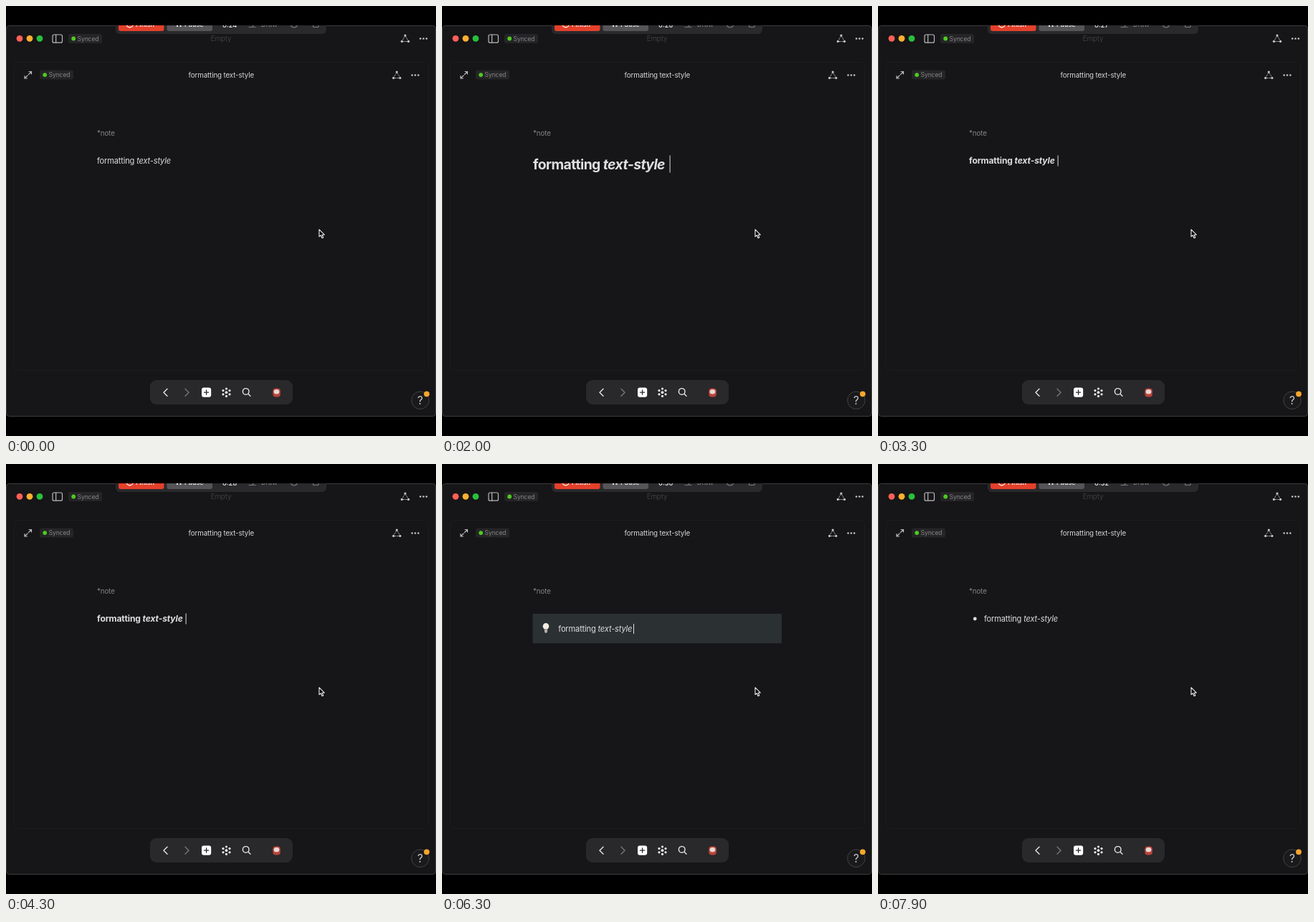
Recreate the animation shown at these times as an HTML page. Size 600 px wide and 600 px high, loop 8 s.

```html
<!DOCTYPE html>
<html lang="en">
<head>
<meta charset="utf-8">
<title>Text styles</title>
<style>
  html, body { margin: 0; width: 100%; height: 100%; overflow: hidden; background: #000; }
  svg { display: block; width: 100vw; height: 100vh; font-family: Inter, "Liberation Sans", sans-serif; }
  .line { fill: none; stroke-linecap: round; stroke-linejoin: round; }
  .pill { font-size: 8.6px; letter-spacing: -.13px; fill: #858487; }
  .title { font-size: 9.8px; letter-spacing: -.14px; text-anchor: middle; }
  .tool { font-size: 9px; font-weight: 600; }
  #copy { fill: #dedddf; white-space: pre; }
  #copy .it { font-style: italic; }
  .mark { display: none; }
</style>
</head>
<body>
<svg viewBox="0 0 600 600">
  <defs>
    <clipPath id="win"><rect y="27" width="600" height="546" rx="4"/></clipPath>
    <g id="synced">
      <rect width="47" height="13" rx="3" fill="#252427"/>
      <circle cx="7.2" cy="6.5" r="2.9" fill="#4dcb1f"/>
      <text class="pill" x="12.6" y="9.6">Synced</text>
    </g>
    <g id="graph">
      <path class="line" d="M-.8-2.6-3.9 2.6M.8-2.6 3.9 2.6M-2.6 4.2H2.6" stroke="#aaa9ac" stroke-dasharray="1.6 1.7"/>
      <g fill="#c6c5c8"><circle cy="-4.2" r="1.6"/><circle cx="-4.6" cy="4.1" r="1.6"/><circle cx="4.6" cy="4.1" r="1.6"/></g>
    </g>
    <g id="more" fill="#c6c5c8"><circle cx="-4.3" r="1.3"/><circle r="1.3"/><circle cx="4.3" r="1.3"/></g>
  </defs>

  <rect width="600" height="600"/>
  <rect x=".5" y="27.5" width="599" height="545" rx="4" fill="#161517" stroke="#3d3c3f"/>
  <rect x="11.5" y="78.5" width="578" height="430" rx="6" fill="none" stroke="#1d1c1f"/>

  <!-- recorder strip, cut off by the window edge -->
  <g clip-path="url(#win)">
    <rect x="153" y="12" width="294" height="27" rx="6" fill="#2a292c"/>
    <rect x="157" y="12" width="63.500" height="23" rx="3" fill="#e4402b"/>
    <rect x="224.500" y="12" width="63.500" height="23" rx="3" fill="#555457"/>
    <circle class="line" cx="172.700" cy="25" r="4.800" stroke="#fff" stroke-width="1.200"/>
    <path d="M238 20h2v9h-2zM242.500 20h2v9h-2z" fill="#e8e8e8"/>
    <g class="tool">
      <text x="181" y="29" fill="#fff">Finish</text>
      <text x="249" y="29" fill="#e8e8e8">Pause</text>
      <text id="clock" x="302" y="30" fill="#dddcdf"></text>
      <text x="356" y="29" fill="#77767a">Draw</text>
    </g>
    <g class="line" stroke="#77767a" stroke-width="1.200">
      <path d="M339 29.500h4l5-5M345 29.500h3"/>
      <circle cx="402" cy="25" r="5"/>
      <rect x="428.500" y="22" width="7.500" height="7.500" rx="1"/>
    </g>
  </g>

  <!-- window header -->
  <circle cx="19" cy="45.300" r="4.400" fill="#ff5f57"/>
  <circle cx="33" cy="45.300" r="4.400" fill="#fdb02f"/>
  <circle cx="47" cy="45.300" r="4.400" fill="#28c03c"/>
  <g class="line" stroke="#bab9bc" stroke-width="1.200">
    <rect x="65" y="40" width="13.500" height="11.200" rx="2"/>
    <path d="M69.700 40V51"/>
  </g>
  <use href="#synced" x="87" y="39"/>
  <text class="title" x="300" y="49" fill="#3f3e42">Empty</text>
  <use href="#graph" x="557" y="45.300"/>
  <use href="#more" x="582.500" y="45.500"/>

  <!-- page header -->
  <path class="line" d="M32 91.500h3.500V95M35.500 91.500l-4 4M29.500 101H26v-3.500M26 101l4-4" stroke="#bab9bc" stroke-width="1.200"/>
  <use href="#synced" x="47" y="89.600"/>
  <text class="title" x="300.300" y="99.700" fill="#d6d5d8">formatting text-style</text>
  <use href="#graph" x="545.300" y="96.300"/>
  <use href="#more" x="571" y="96.500"/>

  <!-- document -->
  <text x="127" y="180.800" font-size="9.800" letter-spacing="-.1" fill="#858487">*note</text>
  <rect class="mark" id="quote" x="134" y="205" width="1.600" height="21" fill="#dedddf"/>
  <g class="mark" id="callout">
    <rect x="126.500" y="209" width="347.500" height="41.300" rx="1.500" fill="#2b3032"/>
    <path d="M142.700 230.500c-1.200-1.500-2-2.500-2-4.200a4.300 4.300 0 0 1 8.600 0c0 1.700-.8 2.700-2 4.200z" fill="#f4ece2"/>
    <path d="M143 230.800h4v3.200l-1 1.800h-2l-1-1.800z" fill="#b5aeaa"/>
  </g>
  <circle class="mark" id="check" cx="135" cy="216" r="6" fill="none" stroke="#b0afb2"/>
  <circle class="mark" id="bullet" cx="135.300" cy="216" r="2.400" fill="#dedddf"/>
  <text id="copy">formatting <tspan class="it">text-style</tspan></text>
  <rect id="caret" width="1" fill="#dedddf"/>

  <!-- navigation -->
  <rect x="201" y="522" width="199" height="34" rx="9" fill="#29282b"/>
  <g class="line" stroke-width="1.400">
    <path d="M225 534.300l-5 5 5 5" stroke="#e8e7ea"/>
    <path d="M250 534.300l5 5-5 5" stroke="#77767a"/>
    <g stroke="#e8e7ea"><circle cx="334.700" cy="537.900" r="4.300"/><path d="M338 541.200l3 3"/></g>
  </g>
  <rect x="273" y="532.500" width="13.200" height="13.200" rx="3" fill="#fff"/>
  <path class="line" d="M279.600 536v6.200M276.500 539.100h6.200" stroke="#29282b" stroke-width="1.300"/>
  <g id="flower" fill="#f0eff2"><circle cx="307.500" cy="539.200" r="1.900"/></g>
  <path d="M357 532v14" stroke="#2d2c2f"/>
  <rect x="372.300" y="533.500" width="10.600" height="12" rx="4" fill="#b9433a"/>
  <ellipse cx="377.500" cy="538.300" rx="3.800" ry="3.200" fill="#e6d9d6"/>

  <circle cx="578" cy="550.200" r="12.300" fill="#1a191b" stroke="#424144"/>
  <text x="578" y="555.800" font-size="15.500" text-anchor="middle" fill="#c9c8cb">?</text>
  <circle cx="587" cy="541.300" r="3.900" fill="#f6a62c"/>

  <path d="M437 311.800v10l2.300-2 1.700 3.900 1.800-.8-1.700-3.700h3.100z" fill="#000" stroke="#f2f2f2" stroke-width="1.100" stroke-linejoin="round"/>
</svg>
<script>
const LOOP = 8000, BLINK = 500, CLOCK_START = 24.3;
const $ = id => document.getElementById(id);

// size, letter spacing, weight
const FONTS = {
  body: [11.1, -.18, 400],
  h1: [19.4, -.6, 700],
  h2: [15.3, -.35, 700],
  h3: [12.1, -.14, 700]
};

// start ms, font, text x, baseline, caret x, caret top, caret height, mark
const STEPS = [
  [-600, 'body', 127, 219.9, 232, 209, 14, ''],
  [1600, 'h1', 127, 227.6, 317.6, 208.5, 24, ''],
  [2300, 'h2', 127, 223.6, 280, 208.5, 19, ''],
  [3000, 'h3', 127, 220.2, 250.6, 208.5, 15, ''],
  [5000, 'body', 147, 219.3, 251.7, 208.5, 14, 'quote'],
  [5900, 'body', 162.3, 234, 267, 223, 14, 'callout'],
  [6400, 'body', 148, 219.9, 252.8, 209, 14, 'check'],
  [7200, 'body', 148, 219.9, 252.8, 209, 14, 'bullet']
];

const setAttrs = (el, attrs) => {
  for (const key in attrs) el.setAttribute(key, attrs[key]);
};

// six petals around the centre dot
for (let i = 0; i < 6; i++) {
  const a = Math.PI * (i / 3 + .5);
  const dot = document.createElementNS('http://www.w3.org/2000/svg', 'circle');
  setAttrs(dot, { cx: 307.5 + 5.2 * Math.cos(a), cy: 539.2 + 5.2 * Math.sin(a), r: 1.6 });
  $('flower').append(dot);
}

let shown;
function applyStep(step) {
  const [, font, x, y, caretX, caretY, height, mark] = step;
  const [size, spacing, weight] = FONTS[font];
  setAttrs($('copy'), { x, y, 'font-size': size, 'letter-spacing': spacing, 'font-weight': weight });
  setAttrs($('caret'), { x: caretX, y: caretY, height });
  document.querySelectorAll('.mark').forEach(el => {
    el.style.display = el.id === mark ? 'inline' : 'none';
  });
  shown = step;
}

function draw(now) {
  const t = now % LOOP;
  const step = STEPS.findLast(s => s[0] <= t);
  if (step !== shown) applyStep(step);
  const lit = (t - step[0]) % (2 * BLINK) < BLINK;
  $('caret').style.visibility = lit ? 'visible' : 'hidden';
  $('clock').textContent = '0:' + Math.floor(CLOCK_START + t / 1000);
}

const start = performance.now();
function tick() {
  draw(performance.now() - start);
  requestAnimationFrame(tick);
}
tick();
</script>
</body>
</html>
```
